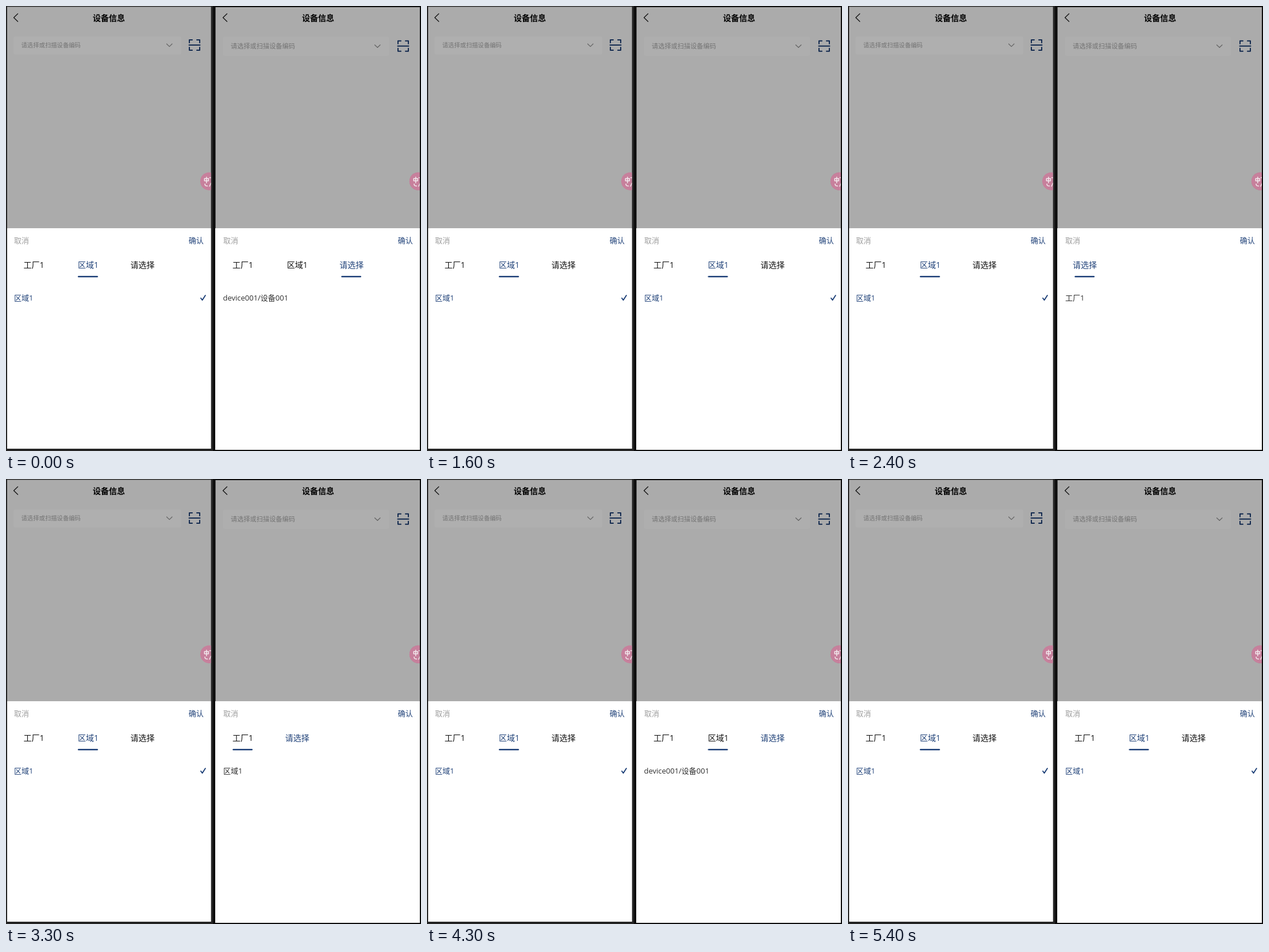
These frames come from a looping animation (722 by 775 pixels, 6.4 s). An HTML page:

```html
<!DOCTYPE html>
<html>
<head>
<meta charset="utf-8">
<title>设备信息</title>
<style>
  html, body { margin: 0; width: 100%; height: 100%; overflow: hidden; background: #111; }
  svg { display: block; width: 722px; height: 775px; }
  text { font: 14px "Open Sans", "Noto Sans CJK SC", "Noto Sans CJK", sans-serif; fill: #111; }
  .title { font-weight: 700; fill: #000; }
  .hint { fill: #a5a5a5; }
  .item, .cancel, .ok { font-size: 13px; }
  .item { fill: #2e2e2e; }
  .cancel { fill: #9c9c9c; }
  .ok, .on { fill: #1f4178; }
  .stroke { fill: none; stroke-linecap: round; stroke-linejoin: round; }
  .line { fill: #1f4178; }
  .page { fill: #f5f5f5; }
  .field { fill: #fafafa; }
  .shade { fill: #000; opacity: .3; }

  .sheet, .state, .move { animation: 6.4s step-end infinite; }
  .sheet { animation-name: sheet; }
  .first { animation-name: first; }
  .second { animation-name: second; }
  .third { animation-name: third; }
  .back { animation-name: back; }
  .move { animation-name: move; }

  @keyframes sheet {
    0%, 37.5% { opacity: 1; }
    26.5625% { opacity: 0; }
  }
  @keyframes first {
    0%, 51.5625% { opacity: 0; }
    37.5% { opacity: 1; }
  }
  @keyframes second {
    0%, 67.1875% { opacity: 0; }
    51.5625% { opacity: 1; }
  }
  @keyframes third {
    0%, 67.1875% { opacity: 1; }
    1.5625%, 81.25% { opacity: 0; }
  }
  @keyframes back {
    0%, 26.5625% { opacity: 0; }
    1.5625%, 81.25% { opacity: 1; }
  }
  /* underline slides between tabs at 0, 94.5 and 189 px */
  @keyframes move {
    0% { transform: translateX(189px); }
    1.5625% { transform: translateX(180px); }
    3.125% { transform: translateX(118px); }
    4.6875% { transform: translateX(94.5px); }
    37.5% { transform: translateX(0); }
    53.125% { transform: translateX(11px); }
    54.6875% { transform: translateX(57px); }
    56.25% { transform: translateX(86px); }
    57.8125% { transform: translateX(94.5px); }
    68.75% { transform: translateX(128px); }
    70.3125% { transform: translateX(175px); }
    71.875% { transform: translateX(189px); }
    81.25% { transform: translateX(180px); }
    82.8125% { transform: translateX(118px); }
    84.375% { transform: translateX(94.5px); }
  }
</style>
</head>
<body>
<svg viewBox="0 0 722 775">
  <defs>
    <g id="top">
      <path class="stroke" d="M20.5 13.5L13.5 20.2L20.5 27" stroke="#222" stroke-width="1.4"/>
      <text class="title" x="151" y="25.6">设备信息</text>
    </g>
    <g id="scan" class="stroke" stroke="#1c3d72" stroke-width="2">
      <path d="M319 64V59H324M332 59H337V64M337 72V77H332M324 77H319V72M318.5 68H337.5"/>
    </g>
    <path id="arrow" class="stroke" d="M279.5 66L284.3 70.6L289 66" stroke="#8f8f8f" stroke-width="1.2"/>
    <path id="check" class="stroke" d="M339 508.8L341.5 512.3L346.8 504" stroke="#1f4178" stroke-width="1.9"/>
    <g id="badge">
      <circle cx="353.5" cy="305.3" r="15.6" fill="currentColor"/>
      <g class="stroke" stroke="#f3e9ed" stroke-width="1.5">
        <path d="M345.3 300.5H352.3V304.6H345.3ZM348.8 298V308M354.3 299H358M346 310C346 312.5 347.5 313.6 350.5 313.6M354 314L356.5 308.5"/>
      </g>
    </g>
    <g id="bar">
      <text class="cancel" x="14" y="413">取消</text>
      <text class="ok" x="317.7" y="413">确认</text>
    </g>
    <clipPath id="left"><path d="M2 1.5H356.5V771H2Z"/></clipPath>
    <clipPath id="right"><path d="M364.5 2H720V773H364.5Z"/></clipPath>
  </defs>

  <path d="M0 0H360V775H0Z" fill="#242424"/>
  <path d="M360 0H722V775H360Z" fill="#0d0d0d"/>

  <g clip-path="url(#left)">
    <path class="page" d="M0 0H360V775H0Z"/>
    <rect class="field" x="13" y="53" width="292" height="31.5" rx="4"/>
    <use href="#top"/>
    <text class="hint" x="26.5" y="72" style="font-size:10.35px">请选择或扫描设备编码</text>
    <use href="#arrow"/>
    <use href="#scan"/>
    <path class="shade" d="M0 0H360V775H0Z"/>
    <use href="#badge" color="#c7809c"/>
    <path d="M0 387H360V775H0Z" fill="#fff"/>
    <use href="#bar"/>
    <text x="30.5" y="456.3">工厂1</text>
    <text class="on" x="125" y="456.3">区域1</text>
    <text x="216.5" y="456.3">请选择</text>
    <rect class="line" x="125" y="470" width="35" height="2.4" rx="1.2"/>
    <text class="item on" x="14" y="512.8">区域1</text>
    <use href="#check"/>
  </g>

  <g clip-path="url(#right)">
    <path class="page" d="M360 0H722V775H360Z"/>
    <rect class="field" x="377.5" y="53.5" width="289" height="33.5" rx="4"/>
    <use href="#top" x="364"/>
    <text class="hint" x="391" y="74" style="font-size:11.2px">请选择或扫描设备编码</text>
    <use href="#arrow" x="362" y="1.7"/>
    <use href="#scan" x="363" y="1.8"/>
    <use href="#badge" x="364" color="#f0aac8"/>

    <g class="sheet">
      <path class="shade" d="M360 0H722V775H360Z"/>
      <use href="#badge" x="364" color="#c7809c"/>
      <path d="M360 387H722V775H360Z" fill="#fff"/>
      <use href="#bar" x="364"/>
      <g class="state first">
        <text class="on" x="391" y="456.3">请选择</text>
        <text class="item" x="378" y="512.8">工厂1</text>
      </g>
      <g class="state second">
        <text x="394" y="456.3">工厂1</text>
        <text class="on" x="485.7" y="456.3">请选择</text>
        <text class="item" x="378" y="512.8">区域1</text>
      </g>
      <g class="state third">
        <text x="394" y="456.3">工厂1</text>
        <text x="488.7" y="456.3">区域1</text>
        <text class="on" x="580.2" y="456.3">请选择</text>
        <text class="item" x="377.5" y="512.8">device001/设备001</text>
      </g>
      <g class="state back">
        <text x="394" y="456.3">工厂1</text>
        <text class="on" x="488.7" y="456.3">区域1</text>
        <text x="580.2" y="456.3">请选择</text>
        <text class="item on" x="378" y="512.8">区域1</text>
        <use href="#check" x="364"/>
      </g>
      <rect class="line move" x="394.3" y="470" width="34.7" height="2.4" rx="1.2"/>
    </g>
  </g>
</svg>
</body>
</html>
```
